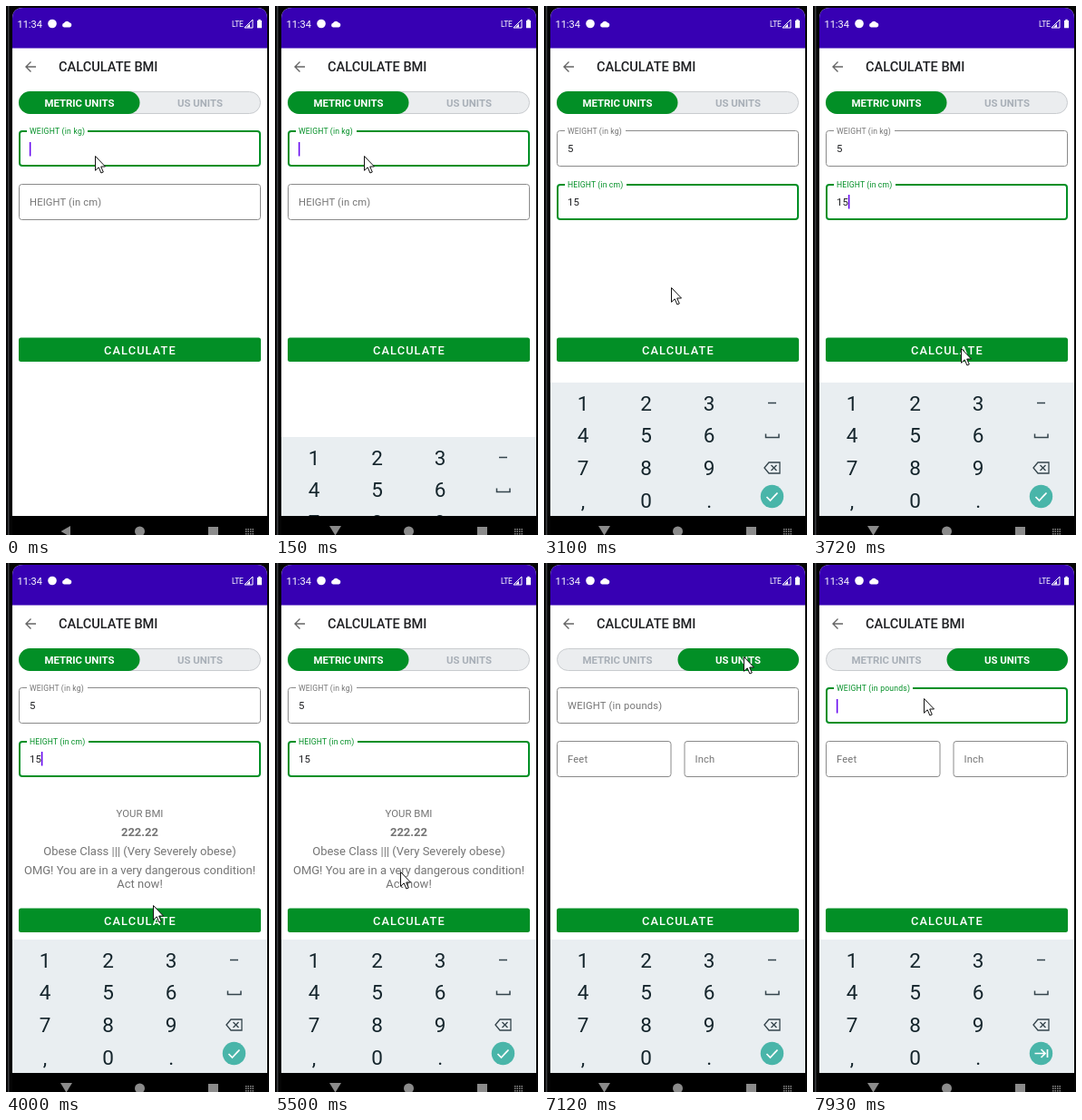
Write an HTML page that moves like this. It is 290 px wide and 583 px high and loops after 8000 ms.

```html
<!DOCTYPE html>
<html lang="en">
<head>
<meta charset="utf-8">
<title>BMI calculator</title>
<style>
  html, body { margin: 0; width: 100%; height: 100%; overflow: hidden; background: #000; }
  svg { display: block; width: 290px; height: 583px; font-family: Roboto, sans-serif; }
</style>
</head>
<body>
<svg viewBox="0 0 290 583">
  <rect width="290" height="583" fill="#050505"/>
  <rect x="2" width="1.5" height="583" fill="#3b3d40"/>
  <path d="M7 562V14Q7 2 19 2H277Q288 2 288 14V562Z" fill="#fff"/>
  <path d="M7 46.500V14Q7 2 19 2H277Q288 2 288 14V46.500Z" fill="#3700b3"/>
  <g fill="#fff">
    <text x="12.500" y="24" font-size="11">11:34</text>
    <circle cx="51" cy="19.500" r="4.800"/>
    <path d="M64 23.500a2.400 2.400 0 0 1 0-4.700a3.400 3.400 0 0 1 6-.6a2.700 2.700 0 0 1 .3 5.300z"/>
    <text x="249" y="23" font-size="8.500" letter-spacing="-.3">LTE</text>
    <path d="M263 24L272 15V24Z" fill="none" stroke="#fff"/>
    <path d="M265 23.500L269 19.500V23.500Z"/>
    <path d="M277 16h1.300v-1.200h2.400V16H282v8.300h-5z"/>
  </g>
  <path d="M33 67H22M27.500 61.500L22 67L27.500 72.500" fill="none" stroke="#666" stroke-width="1.400"/>
  <text x="58" y="72.300" font-size="14.600" font-weight="500" fill="#202124">CALCULATE BMI</text>
  <g id="form"></g>
  <g id="keyboard"></g>
  <rect x="7" y="562" width="281" height="21" fill="#000"/>
  <g id="nav" fill="#8b8b8b"></g>
  <path id="pointer" d="M.5.5V16.300L4.200 12.800L6.900 19L9.300 18L6.700 12H11.500Z" fill="#fff" stroke="#111"/>
</svg>
<script>
const LOOP = 8000;
const GREEN = '#028f26', GRAY = '#757575';
const WEIGHT_Y = 138, HEIGHT_Y = 196;

const MOMENTS = {
  keyboard: 150, keyboardOpen: 290, weightTyped: 560,
  heightFocus: 1420, heightSettled: 1560, firstDigit: 2410, secondDigit: 2670,
  result: 3750, usUnits: 6980, poundsFocus: 7800, poundsSettled: 7930
};

// time, x, y
const POINTER = [
  [0, 98, 165], [720, 97, 164], [1010, 96, 180], [1150, 96, 210], [1280, 96, 218],
  [3100, 140, 310], [3230, 152, 342], [3360, 160, 368], [3490, 163, 377], [4000, 162, 377],
  [4270, 170, 374], [4410, 181, 369], [4550, 188, 365],
  [5240, 170, 352], [5370, 150, 343], [5500, 138, 340], [5650, 146, 345], [5780, 165, 356], [6020, 186, 365],
  [6170, 190, 340], [6310, 200, 290], [6450, 212, 225], [6600, 220, 181], [6720, 222, 140], [6850, 222, 113], [6980, 220, 103],
  [7270, 205, 112], [7410, 175, 130], [7540, 145, 145], [7670, 126, 150], [7800, 122, 149]
];

// time, x (0 hides the caret), field top
const CARET = [
  [0, 26, WEIGHT_Y], [290, 0], [560, 33, WEIGHT_Y], [1010, 0],
  [1280, 26, HEIGHT_Y], [1850, 0], [2410, 33, HEIGHT_Y], [2670, 39, HEIGHT_Y],
  [3100, 0], [3620, 39, HEIGHT_Y], [4120, 0], [4550, 39, HEIGHT_Y], [5100, 0],
  [5650, 39, HEIGHT_Y], [6170, 0], [6600, 39, HEIGHT_Y], [7120, 0], [7800, 26, WEIGHT_Y]
];

const times = [...new Set([...Object.values(MOMENTS), ...POINTER.map(p => p[0]), ...CARET.map(c => c[0])])]
  .sort((a, b) => a - b);
const at = (table, t) => table.findLast(row => row[0] <= t);
const byId = id => document.getElementById(id);

const text = (x, y, size, fill, value, extra = '') =>
  `<text x="${x}" y="${y}" font-size="${size}" fill="${fill}" ${extra}>${value}</text>`;
const middle = 'text-anchor="middle"';

// float: 0 label rests inside, 1 label sits on the border
function field({ x = 14, y, w = 267, h = 40, label, gap = 0, float = 0, focus, value = '', spacing = .15 }) {
  const color = focus ? GREEN : GRAY;
  const line = focus ? 2 : 1, inset = line / 2;
  const size = 11.2 - 2.6 * float;
  const baseline = y + 23.7 - 19.3 * float;
  return `<rect x="${x + inset}" y="${y + inset}" width="${w - line}" height="${h - line}" rx="3"
      fill="none" stroke="${focus ? GREEN : '#8a8a8a'}" stroke-width="${line}"/>` +
    (float ? `<rect x="${x + 9}" y="${y - 1}" width="${gap}" height="4" fill="#fff"/>` : '') +
    text(x + 12, baseline, size, color, label, `letter-spacing="${spacing}"`) +
    text(x + 12, y + 24, 11.4, '#202124', value);
}

function toggle(us) {
  const tab = (label, cx, on) => text(cx, 110.900, 11.4, on ? '#fff' : '#a8afb7', label, `font-weight="700" ${middle}`);
  return `<rect x="14.500" y="94.500" width="266" height="24" rx="12" fill="#ebedef" stroke="#c9cccf"/>
    <rect x="${us ? 147.5 : 14}" y="94" width="133.500" height="25" rx="12.500" fill="${GREEN}"/>` +
    tab('METRIC UNITS', 81, !us) + tab('US UNITS', 214, us);
}

function results() {
  const line = (y, size, value, extra = '') => text(147.5, y, size, GRAY, value, `${middle} ${extra}`);
  return line(280, 11.4, 'YOUR BMI') + line(301, 13, '222.22', 'font-weight="700"') +
    line(322, 13, 'Obese Class ||| (Very Severely obese)') +
    line(343, 13, 'OMG! You are in a very dangerous condition!') +
    line(358.2, 13, 'Act now!');
}

function button(y) {
  return `<rect x="14" y="${y}" width="267" height="26.500" rx="2.500" fill="${GREEN}"/>` +
    text(108, y + 18, 12.8, '#fff', 'CALCULATE', 'font-weight="500" letter-spacing="1.1"');
}

function fields(t, m) {
  if (t >= m.usUnits) {
    const focus = t >= m.poundsFocus;
    const float = t >= m.poundsSettled ? 1 : focus ? .6 : 0;
    return field({ y: WEIGHT_Y - 1, label: 'WEIGHT (in pounds)', gap: 87, float, focus, spacing: .22 }) +
      field({ y: HEIGHT_Y, w: 126.5, label: 'Feet' }) +
      field({ x: 154.5, y: HEIGHT_Y, w: 126.5, label: 'Inch' });
  }
  const onHeight = t >= m.heightFocus;
  return field({
    y: WEIGHT_Y - 1, label: 'WEIGHT (in kg)', gap: 67, float: 1, focus: !onHeight,
    value: t >= m.weightTyped ? '5' : '', spacing: t < m.keyboard ? .25 : .15
  }) + field({
    y: HEIGHT_Y, label: 'HEIGHT (in cm)', gap: 68, focus: onHeight,
    float: t >= m.heightSettled ? 1 : onHeight ? .6 : 0,
    value: t >= m.secondDigit ? '15' : t >= m.firstDigit ? '1' : ''
  });
}

function caret(t) {
  const [, x, y] = at(CARET, t);
  return x ? `<rect x="${x - .1}" y="${y + 12}" width="1.500" height="15.500" fill="#6200ee"/>` : '';
}

function keyboard(t, m) {
  if (t < m.keyboard) return '';
  const shift = t < m.keyboardOpen ? 60 : 0;
  const rows = ['123', '456', '789', ',0.'];
  const digits = rows.map((row, r) => [...row].map((key, c) =>
    text(43 + 69.6 * c, 445.7 + 35.7 * r, 22.5, '#15252c', key, middle)).join('')).join('');
  const done = t >= m.heightSettled && t < m.poundsSettled;
  const action = done ? 'M245.500 541L249.500 545L257.500 536.500'
    : 'M244.500 540.500H256M251.500 536L256 540.500L251.500 545M258.500 536V545';
  return `<g transform="translate(0 ${shift})">
    <rect x="7" y="415" width="281" height="147" fill="#e9eef1"/>${digits}
    <g fill="none" stroke="#34444c" stroke-width="1.500">
      <path d="M247 437.500H256M244.500 471.500V475.500H259V471.500"/>
      <path d="M243 509L248 503H260V515H248ZM250.500 506L256.500 512M256.500 506L250.500 512" stroke-width="1.300"/>
    </g>
    <circle cx="251.500" cy="540.500" r="12.700" fill="#49b5a9"/>
    <path d="${action}" fill="none" stroke="#fff" stroke-width="1.700"/></g>`;
}

function nav(open) {
  const dots = [0, 1, 2].map(r => [0, 1, 2, 3].map(c =>
    `<rect x="${264 + c * 2.5}" y="${576 + r * 2.5}" width="1.500" height="1.500"/>`).join('')).join('');
  return `<path d="${open ? 'M60 573H73L66.500 583.500Z' : 'M71 573V585L60.500 579Z'}"/>
    <circle cx="147.500" cy="579" r="5.500"/><rect x="223" y="574" width="11" height="11"/>${dots}`;
}

function render(t) {
  const m = MOMENTS;
  const calculated = t >= m.result;
  byId('form').innerHTML = toggle(t >= m.usUnits) + fields(t, m) + caret(t) +
    (calculated && t < m.usUnits ? results() : '') + button(calculated ? 380.5 : 365.5);
  byId('keyboard').innerHTML = keyboard(t, m);
  byId('nav').innerHTML = nav(t >= m.keyboard);
  const [, x, y] = at(POINTER, t);
  byId('pointer').setAttribute('transform', `translate(${x} ${y})`);
}

const start = performance.now();
let shown = -1;
function tick(now) {
  const t = Math.max(0, now - start) % LOOP;
  const step = times.findLast(time => time <= t);
  if (step !== shown) render(shown = step);
  requestAnimationFrame(tick);
}
tick(start);
</script>
</body>
</html>
```
